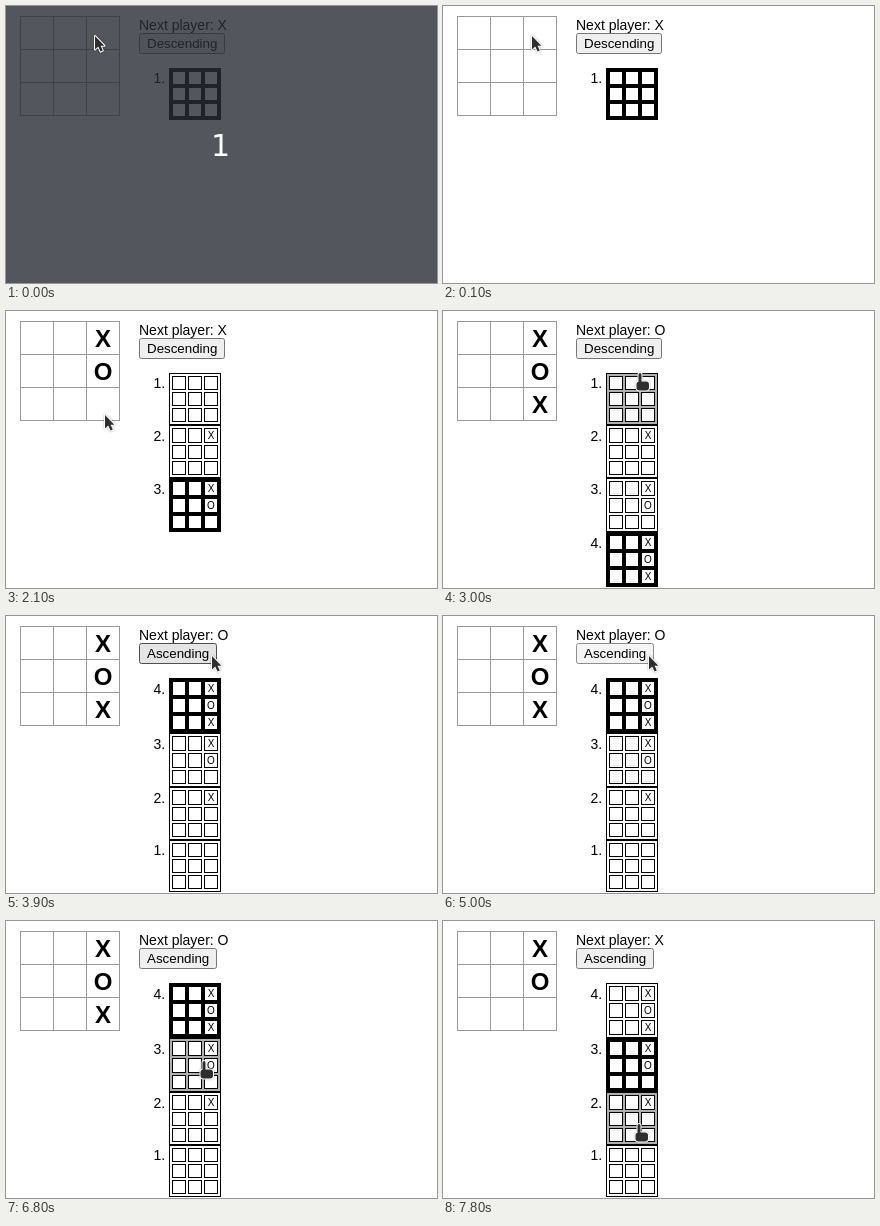
An HTML page with a canvas for the animation above (8 s loop, 431 px wide and 277 px high).

```html
<!DOCTYPE html>
<html lang="en">
<head>
<meta charset="utf-8">
<title>Tic-tac-toe history</title>
<style>
  html, body { margin: 0; width: 431px; height: 277px; overflow: hidden; background: #fff; }
  canvas { display: block; }
</style>
</head>
<body>
<canvas id="stage" width="431" height="277"></canvas>
<script>
const ctx = document.getElementById('stage').getContext('2d', { alpha: false });
const LOOP = 8000, STEP = 100;
const BOARD = { x: 14, y: 10, pitch: 33 };
const BUTTON = { x: 133, y: 27, h: 21 };
const LIST = { x: 163, y: 62, w: 52 };

// Every move goes in the right-hand column, one row further down.
const marks = ['X', 'O', 'X'];

// The pointer glides to each stop in turn and rests there.
const glides = [
  { from: 1000, to: 1300, x: 93, y: 45 },
  { from: 1800, to: 2100, x: 98, y: 102 },
  { from: 2800, to: 3000, x: 197, y: 62 },
  { from: 3000, to: 3400, x: 205, y: 38 },
  { from: 6500, to: 6800, x: 198, y: 140 },
  { from: 7400, to: 7800, x: 196, y: 203 }
];

const arrow = new Path2D('M1 2V15.5L4.2 12.6L6.6 17.6L8.8 16.6L6.6 11.8H10.4Z');
const hand = new Path2D();
hand.roundRect(-1.5, 0, 3, 12, 1.5);
hand.roundRect(-3.5, 8.5, 12.5, 9, 3);

const between = (t, from, to) => t >= from && t < to;
const inside = (p, x, y, w, h) => between(p.x, x, x + w) && between(p.y, y, y + h);

function pointerAt(t) {
  return glides.reduce((p, { from, to, x, y }) => {
    const k = Math.min(1, Math.max(0, (t - from) / (to - from)));
    return { x: Math.round(p.x + (x - p.x) * k), y: Math.round(p.y + (y - p.y) * k) };
  }, { x: 88, y: 28 });
}

function rect(color, x, y, w, h) {
  ctx.fillStyle = color;
  ctx.fillRect(x, y, w, h);
}

function text(str, x, y, size, { align = 'left', color = '#000', weight = '', family = 'Liberation Sans' } = {}) {
  ctx.font = `${weight} ${size}px "${family}", sans-serif`;
  ctx.textAlign = align;
  ctx.fillStyle = color;
  ctx.fillText(str, x, y);
}

function drawBoard(moves) {
  const { x, y, pitch } = BOARD, size = 3 * pitch + 1;
  for (let i = 0; i < 4; i++) {
    rect('#999', x, y + pitch * i, size, 1);
    rect('#999', x + pitch * i, y, 1, size);
  }
  marks.slice(0, moves).forEach((mark, row) =>
    text(mark, x + 2.5 * pitch + .5, y + 26 + pitch * row, 24, { align: 'center', weight: 'bold' }));
}

function drawButton(label, pressed, pointer) {
  const { x, y, h } = BUTTON, w = label === 'Descending' ? 86 : 78;
  const [fill, border] = pressed ? ['#f5f5f5', '#8d8d8d']
    : inside(pointer, x, y, w, h) ? ['#e5e5e5', '#4f4f4f'] : ['#efefef', '#767676'];
  ctx.beginPath();
  ctx.roundRect(x + .5, y + .5, w - 1, h - 1, 2);
  ctx.fillStyle = fill;
  ctx.fill();
  ctx.strokeStyle = border;
  ctx.lineWidth = 1;
  ctx.stroke();
  text(label, x + 8, y + 15, 13.333);
}

// A row that holds a mark is one pixel taller than an empty one.
function drawItem(moves, y, selected, over) {
  const height = LIST.w + moves;
  rect('#000', LIST.x, y, LIST.w, height);
  if (!selected) rect(over ? '#b0b0b0' : '#fff', LIST.x + 1, y + 1, LIST.w - 2, height - 2);
  text(`${moves + 1}.`, LIST.x - 3.9, y + (moves ? 16 : 15), 14, { align: 'right' });
  let top = y + 3;
  for (let row = 0; row < 3; row++) {
    const h = row < moves ? 15 : 14;
    for (let col = 0; col < 3; col++) {
      const x = LIST.x + 3 + 16 * col;
      rect('#000', x, top, 14, h);
      rect('#fff', x + 1, top + 1, 12, h - 2);
    }
    if (row < moves) text(marks[row], LIST.x + 42, top + 11, 10, { align: 'center' });
    top += h + 2;
  }
}

// Returns whether the pointer is over one of the items.
function drawList(count, current, ascending, pointer) {
  let y = LIST.y, hovering = false;
  for (let i = 0; i < count; i++) {
    const moves = ascending ? count - 1 - i : i;
    const height = LIST.w + moves;
    const over = inside(pointer, LIST.x, y, LIST.w, height);
    drawItem(moves, y, moves === current, over);
    hovering ||= over;
    y += height;
  }
  return hovering;
}

function drawPointer(shape, { x, y }) {
  ctx.save();
  ctx.translate(x, y);
  ctx.lineJoin = 'round';
  ctx.lineWidth = 2;
  ctx.strokeStyle = '#fff';
  ctx.shadowColor = 'rgba(0,0,0,.35)';
  ctx.shadowBlur = 2;
  ctx.stroke(shape);
  ctx.shadowColor = 'transparent';
  ctx.fillStyle = '#2e2e2e';
  ctx.fill(shape);
  ctx.restore();
}

function draw(time) {
  const t = Math.floor(time / STEP) * STEP;
  const pointer = pointerAt(t);
  const played = [700, 1700, 2600].filter(at => t >= at).length;
  const current = t >= 7300 ? 2 : played;
  const ascending = between(t, 3900, 5200) || t >= 6100;
  const pressed = between(t, 3800, 3900) || between(t, 5000, 5200) || between(t, 6000, 6100);

  rect('#fff', 0, 0, 431, 277);
  drawBoard(current);
  text(`Next player: ${current % 2 ? 'O' : 'X'}`, BUTTON.x, 24, 14);
  drawButton(ascending ? 'Ascending' : 'Descending', pressed, pointer);
  const hovering = drawList(played + 1, current, ascending, pointer);
  if (t < 100) {
    rect('rgba(40,44,52,.8)', 0, 0, 431, 277);
    text('1', 214.5, 150, 30, { align: 'center', color: '#fff', family: 'DejaVu Sans' });
  }
  drawPointer(hovering ? hand : arrow, pointer);
}

function tick() {
  draw(performance.now() % LOOP);
  requestAnimationFrame(tick);
}
tick();
</script>
</body>
</html>
```
